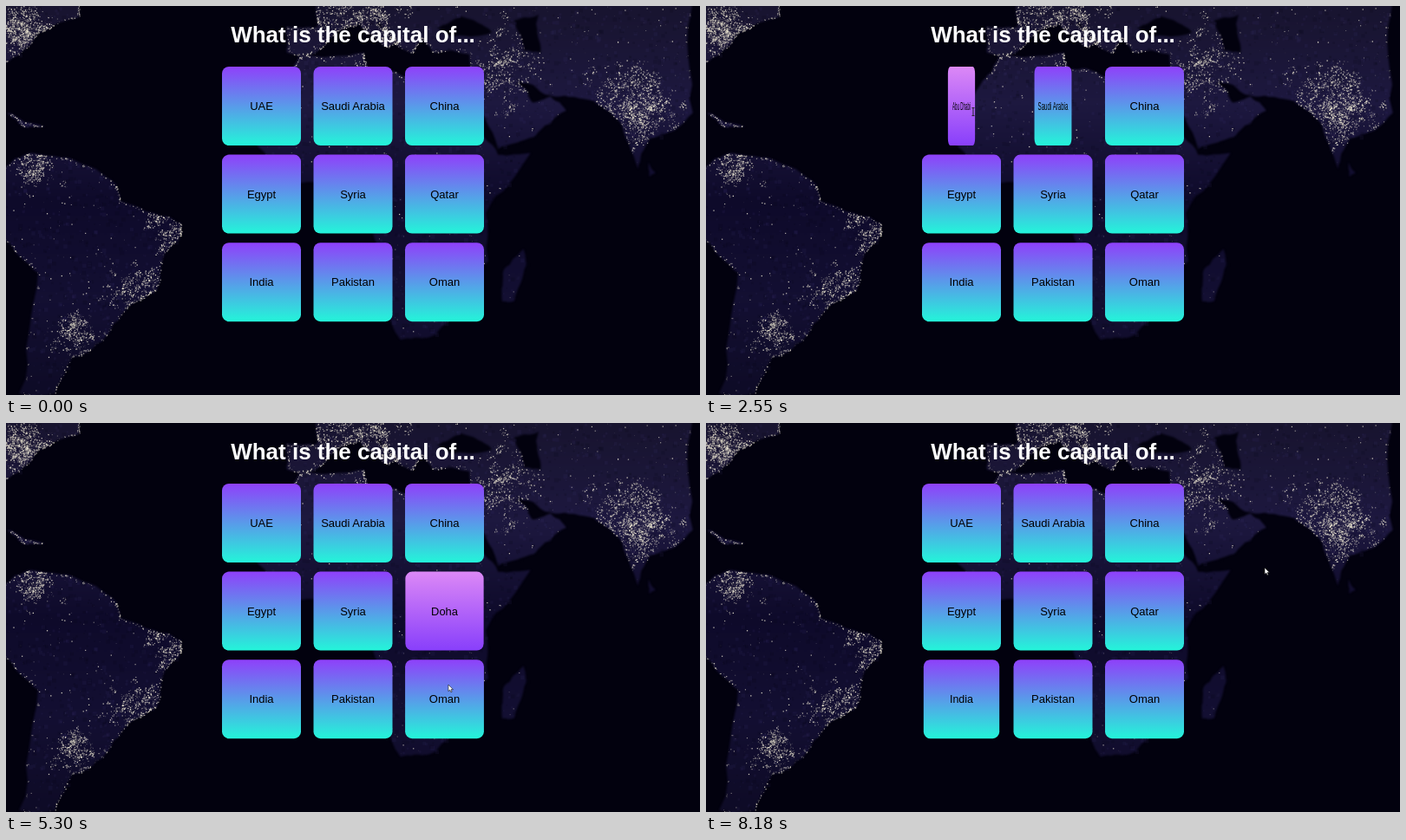
Recreate the animation shown at these times as an HTML page with a canvas. Size 800 by 449 pixels, loop 8.21 s.

```html
<!DOCTYPE html>
<html lang="en">
<head>
<meta charset="utf-8">
<title>Capitals quiz</title>
<style>
html, body { margin: 0; width: 100%; height: 100%; overflow: hidden; background: #02010e; }
body { position: relative; font: 13px "Liberation Sans", Arial, sans-serif; }
canvas, svg, .card { position: absolute; left: 0; top: 0; }
h1 { position: absolute; left: 0; top: 13px; width: 800px; margin: 0; font-size: 26px; line-height: 40px; text-align: center; color: #fff; }
.card { width: 91px; height: 91px; line-height: 91px; border-radius: 8px; text-align: center; white-space: nowrap; color: #000; background: linear-gradient(#8f40fa, #23f5d9); }
.card.back { background: linear-gradient(#dc88f6, #883ffb); }
svg { overflow: visible; }
</style>
</head>
<body>
<canvas id="map" width="800" height="449"></canvas>
<h1>What is the capital of...</h1>
<svg id="cursor" width="8" height="10" stroke-width=".6">
  <path id="arrow" d="M0 0V7.6L1.8 6L3 8.8L4.2 8.2L3.1 5.6H5.5Z" fill="#fff" stroke="#111"/>
  <path id="beam" d="M-1.5 -4.5H1.5M0 -4.5V4.5M-1.5 4.5H1.5" fill="none" stroke="#222" stroke-width="1"/>
</svg>
<script>
const LOOP = 8210, FLIP = 1000, SIZE = 91;
const $ = id => document.getElementById(id);

let seed = 7;
const random = () => (seed = (seed * 1664525 + 1013904223) % 4294967296) / 4294967296;
const bell = () => (random() + random() + random() - 1.5) / 1.5;

// Rough coastlines in degrees of longitude and latitude
const africa = '-6,36 10,37 11,33 20,31 32,31 37,21 43,11.5 51,12 40,-3 40.6,-15 35,-21 32,-29 26,-34 19,-34.6 12,-18 13.5,-12 9,0 9,4.5 -8,4.5 -17,14.7 -16.5,21 -10,30';
const eurasia = '-1.5,50 -1.5,43.4 -9,43.5 -9,37 -2,36.8 3,42 9,44.3 16,38.2 18.5,40 13,45 22,36.7 24,40.4 27,37 36,36.5 35,28 43,13 52,16 59.8,22.5 56,26 51.5,24.5 48,30 57,26 66.5,25 72.8,20 77.5,8 80.3,15.5 91,22 91,50';
const americas = ['-79,8 -72,12 -62,10.5 -51,4 -50,0 -44,-2.5 -35,-5.5 -35,-8.5 -39,-13 -41,-22 -48.5,-27 -57,-37 -62,-39 -66,-48 -75,-48 -70.3,-18 -79,-9',
  '-79,50 -60,50 -60,46 -70,42 -79,34'];
const islands = ['49.3,-12 50,-16 47,-25 44,-25 44.5,-17', '80,9.6 81.8,7 80.3,6', '-78,22 -68.5,18.5 -74,18.5'];
const seas = ['28,43 34,46 41.5,42 31,41.2', '47,45 53,46.5 53.5,37 49.5,37.5'];

// Lit regions: longitude, latitude, reach, towns
const regions = [[-74, 43, 9, 150], [8, 46, 17, 230], [45, 33, 15, 110], [76, 23, 15, 280], [31, 30, 2, 16],
  [-46, -22, 10, 85], [-61, -32, 9, 65], [-71, 8, 8, 60], [-38, -8, 7, 45], [28, -27, 7, 30]];

const project = ([lon, lat]) => [365.9 + 4.68 * lon, 225 - 4.63 * lat];

// Midpoint displacement turns a few corners into a natural shore
function roughen(points, depth) {
  if (!depth) return points;
  return roughen(points.flatMap(([x, y], i) => {
    const [u, v] = points[(i + 1) % points.length], bend = bell() * .16;
    return [[x, y], [(x + u) / 2 + (v - y) * bend, (y + v) / 2 - (u - x) * bend]];
  }), depth - 1);
}
const shore = text => roughen(text.split(' ').map(pair => pair.split(',').map(Number)), 3);
const outline = shores => new Path2D(shores.map(s => 'M' + s.map(project).join('L') + 'Z').join(''));

function drawMap() {
  const ctx = $('map').getContext('2d');
  const shores = [africa, eurasia, ...americas, ...islands].map(shore);
  const land = outline(shores), water = outline(seas.map(shore));
  const isLand = (x, y) => ctx.isPointInPath(land, x, y) && !ctx.isPointInPath(water, x, y);
  const ocean = '#02010e';
  ctx.fillStyle = ocean;
  ctx.fillRect(0, 0, 800, 449);
  const tone = ctx.createLinearGradient(0, 0, 0, 449);
  ['#18142f', '#1d183f', '#0e0a2a', '#130f32', '#0e0b26'].forEach((color, i) => tone.addColorStop(i / 4, color));
  ctx.filter = 'blur(1px)';
  ctx.fillStyle = tone;
  ctx.fill(land);
  ctx.fillStyle = ocean;
  ctx.fill(water);
  ctx.filter = 'none';

  const dot = (x, y, size, color) => {
    if (!isLand(x, y)) return;
    ctx.fillStyle = color;
    ctx.fillRect(x, y, size, size);
  };
  const light = (x, y) => {
    const glow = random();
    dot(x, y, .6 + glow * .7, `rgba(238,232,212,${.15 + .75 * glow * glow})`);
  };
  const town = (lon, lat, count, reach) => {
    for (let i = 0; i < count; i++) light(...project([lon + bell() * reach, lat + bell() * reach]));
  };

  for (let i = 0; i < 5000; i++)
    dot(random() * 800, random() * 449, 1 + random() * 4, random() < .5 ? 'rgba(75,65,130,.1)' : 'rgba(0,0,15,.14)');
  for (const [lon, lat, reach, towns] of regions)
    for (let i = 0; i < towns; i++) town(lon + reach * bell(), lat + reach * bell(), 18 * random(), 1.6);
  for (const [lon, lat] of shores.flat())
    if (lat > 30 || lon < -34) town(lon, lat, 7, .9);
  for (let i = 0; i < 1500; i++) light(random() * 800, random() * 449);
}

// The pointer snakes through the grid; these are the moments it passes from card to card
const crossings = [575, 1355, 2189, 3039, 3825, 4365, 5260, 5987, 6460, 7550], GAP = 8;
const names = [
  ['UAE', 'Abu Dhabi'], ['Saudi Arabia', 'Riyadh'], ['China', 'Beijing'],
  ['Egypt', 'Cairo'], ['Syria', 'Damascus'], ['Qatar', 'Doha'],
  ['India', 'New Delhi'], ['Pakistan', 'Islamabad'], ['Oman', 'Muscat']];

const cards = names.map((_, i) => {
  const row = Math.floor(i / 3), col = row % 2 ? i % 3 : 2 - i % 3;
  const [front, back] = names[row * 3 + col];
  const el = document.createElement('div');
  el.className = 'card';
  document.body.insertBefore(el, $('cursor'));
  return { el, front, back, x: 400 + 105.5 * (col - 1), y: 217.1 + 101.6 * (row - 1),
    enter: crossings[i] + GAP, leave: crossings[i + 1] - GAP };
});

// Pointer stops (time, x, y), joined by the midpoints between neighbouring cards
const stops = [[0, 815, 165], [200, 815, 165], [575, 551, 122], [1120, 523, 118], [2550, 308, 122], [3580, 302, 201],
  [5300, 510, 302], [6390, 365, 314], [7550, 294, 364], [7670, 575, 396], [7960, 642, 195], [8180, 644, 167], [LOOP, 644, 167]];
const passes = cards.slice(1).map((c, i) => [crossings[i + 1], (c.x + cards[i].x) / 2, (c.y + cards[i].y) / 2]);
const track = [...stops, ...passes].sort((a, b) => a[0] - b[0]);

// cubic-bezier(.25, .1, .25, 1)
function ease(x) {
  if (x <= 0) return 0;
  if (x >= 1) return 1;
  const bezier = (a, b, u) => 3 * a * u * (1 - u) ** 2 + 3 * b * u * u * (1 - u) + u ** 3;
  let low = 0, high = 1;
  for (let i = 0; i < 24; i++) {
    const mid = (low + high) / 2;
    if (bezier(.25, .25, mid) < x) low = mid; else high = mid;
  }
  return bezier(.1, 1, low);
}

// Half turns done: forward while hovered, then back from wherever it got to
function turn({ enter, leave }, t) {
  if (t < leave) return ease((t - enter) / FLIP);
  const reached = ease((leave - enter) / FLIP);
  return reached * (1 - ease((t - leave) / (FLIP * reached)));
}

function pointer(t) {
  const i = track.findIndex(p => p[0] > t);
  const [t0, x0, y0] = track[i - 1], [t1, x1, y1] = track[i];
  const k = (t - t0) / (t1 - t0);
  return [x0 + (x1 - x0) * k, y0 + (y1 - y0) * k];
}

function render(t) {
  for (const card of cards) {
    const cos = Math.cos(Math.PI * turn(card, t));
    card.el.classList.toggle('back', cos < 0);
    card.el.textContent = cos < 0 ? card.back : card.front;
    card.el.style.transform = `translate(${card.x - SIZE / 2}px, ${card.y - SIZE / 2}px) scaleX(${Math.abs(cos)})`;
  }
  const [x, y] = pointer(t);
  const overText = cards.some(c => Math.abs(x - c.x) < 20 && Math.abs(y - c.y) < 8);
  $('cursor').style.transform = `translate(${x}px, ${y}px)`;
  $('arrow').style.display = overText ? 'none' : '';
  $('beam').style.display = overText ? '' : 'none';
}

drawMap();
const start = performance.now();
function tick() {
  render((performance.now() - start) % LOOP);
  requestAnimationFrame(tick);
}
tick();
</script>
</body>
</html>
```
